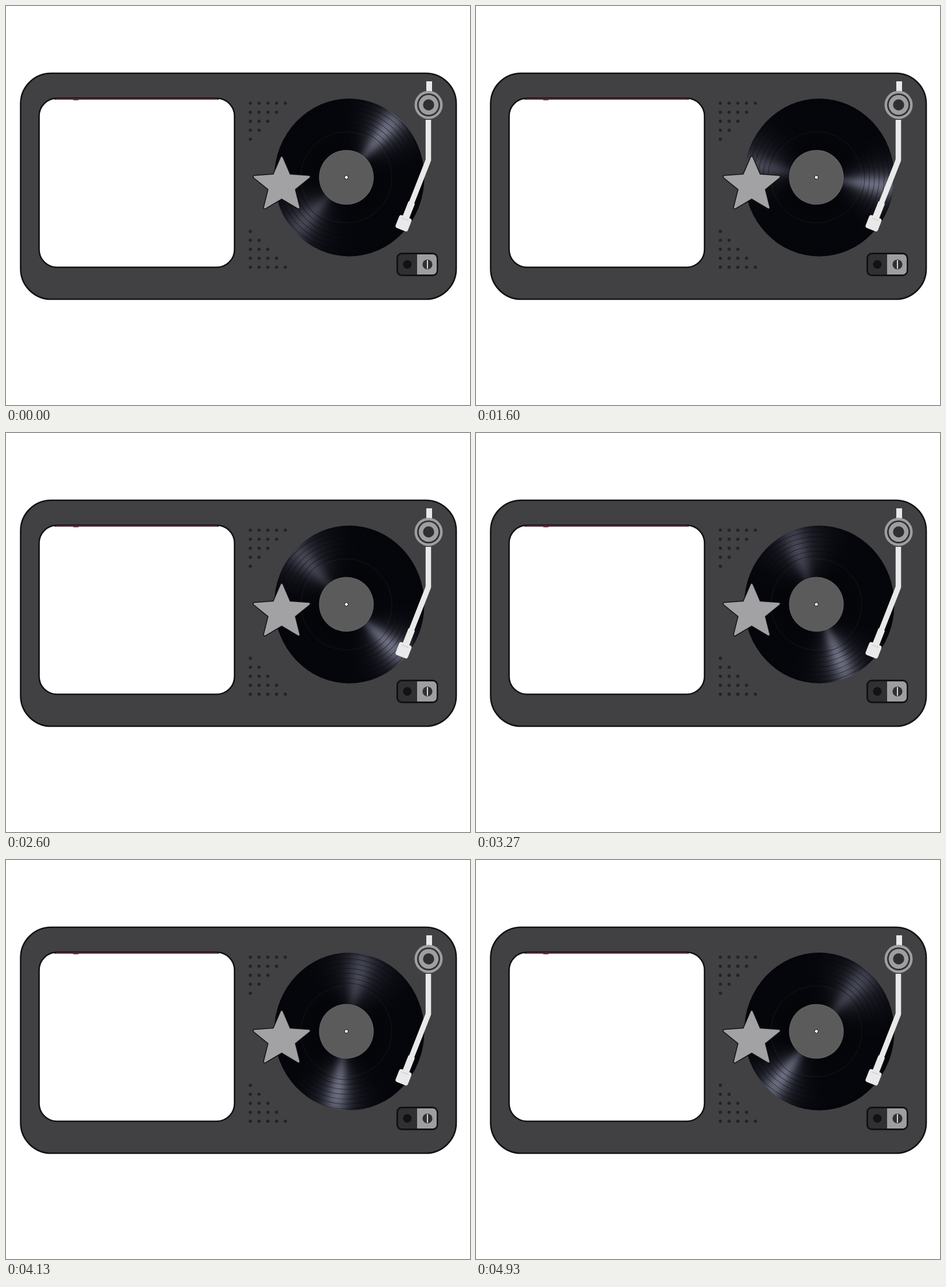
An HTML page with a canvas that plays this animation: 807x694 px, repeating every 4.99 s.

```html
<!DOCTYPE html>
<html lang="en">
<head>
<meta charset="utf-8">
<title>Record player</title>
<style>
html, body { margin: 0; width: 100%; height: 100%; overflow: hidden; background: #fff; }
canvas { display: block; }
</style>
</head>
<body>
<canvas id="stage" width="807" height="694"></canvas>
<script>
const ctx = document.getElementById('stage').getContext('2d');
const LOOP = 4990, STEPS = 75, TAU = Math.PI * 2, DEG = Math.PI / 180;
const INK = '#121214', DARK = '#303032', GRAY = '#9e9ea0', ARM = '#e9e9e9';

function disc(x, y, r, fill) {
  ctx.beginPath();
  ctx.arc(x, y, r, 0, TAU);
  ctx.fillStyle = fill;
  ctx.fill();
}

function ring(r, color, width) {
  ctx.beginPath();
  ctx.arc(0, 0, r, 0, TAU);
  ctx.strokeStyle = color;
  ctx.lineWidth = width;
  ctx.stroke();
}

function box(x, y, w, h, r, fill, line = 0) {
  ctx.beginPath();
  ctx.roundRect(x, y, w, h, r);
  ctx.fillStyle = fill;
  ctx.fill();
  if (!line) return;
  ctx.strokeStyle = INK;
  ctx.lineWidth = line;
  ctx.stroke();
}

// Two facing reflections: a bright one at 0 degrees, a dimmer, wider one opposite.
function makeShine() {
  const gradient = ctx.createConicGradient(0, 0, 0);
  for (let a = 0; a <= 360; a += 2) {
    const bell = (center, width) => {
      const d = Math.abs(a - center);
      return Math.exp(-((Math.min(d, 360 - d) / width) ** 2));
    };
    const light = 0.62 * bell(0, 9) + 0.34 * bell(0, 21)
      + 0.34 * bell(184, 10) + 0.26 * bell(186, 25);
    gradient.addColorStop(a / 360,
      `rgb(${5 + 112 * light},${6 + 113 * light},${11 + 128 * light})`);
  }
  return gradient;
}

// Darkens the record towards its label and its rim.
function makeShade() {
  const reach = 142, gradient = ctx.createRadialGradient(0, 0, 0, 0, 0, reach);
  for (let r = 44; r <= reach; r += 7) {
    const alpha = Math.min(0.65, 0.5 * ((r - 102) / 50) ** 2);
    gradient.addColorStop(r / reach, `rgba(3,4,8,${alpha})`);
  }
  return gradient;
}

const shine = makeShine(), shade = makeShade();

function drawCase() {
  box(25.5, 117, 757.5, 393, 53, '#414143', 2.6);
  box(57.5, 160.5, 340, 294, 31, '#fff', 2.6);
  ctx.fillStyle = '#7d1a42';
  ctx.fillRect(84, 162, 286, 1);
  ctx.fillRect(117, 163, 9, 1);
  for (let row = 0; row < 5; row++) {
    for (let i = 0; i < 5 - row; i++) {
      const x = 425 + i * 15.2;
      disc(x, 169 + row * 15.7, 2.8, '#232325');
      disc(x, 454.3 - row * 15.6, 2.8, '#232325');
    }
  }
}

function drawRecord(turn) {
  ctx.save();
  ctx.beginPath();
  ctx.ellipse(597, 298.3, 130.5, 137.2, 0, 0, TAU);
  ctx.clip();
  ctx.translate(592, 298);
  ctx.rotate(turn);
  for (const fill of [shine, shade]) {
    ctx.fillStyle = fill;
    ctx.fillRect(-200, -200, 400, 400);
  }
  for (let r = 84; r < 136; r += 8.5) ring(r, 'rgba(5,6,12,.45)', 1.2);
  for (let r = 55; r < 136; r += 3) ring(r, 'rgba(3,4,8,.12)', 1);
  ring(79, 'rgba(62,46,56,.4)', 0.8);
  disc(0, 0, 47.5, '#6b6b67');
  disc(0, 0, 46.7, '#5b5b5b');
  disc(0, 0, 3.8, DARK);
  box(-2.3, -2.3, 4.6, 4.6, 1, '#fff');
  ctx.restore();
}

function drawStar() {
  ctx.beginPath();
  for (let i = 0; i < 10; i++) {
    const r = i % 2 ? 21.5 : 48, a = i * TAU / 10;
    ctx.lineTo(479.5 + 1.04 * r * Math.sin(a), 311.8 - r * Math.cos(a));
  }
  ctx.closePath();
  ctx.lineJoin = 'round';
  ctx.strokeStyle = INK;
  ctx.lineWidth = 6;
  ctx.stroke();
  ctx.fillStyle = ctx.strokeStyle = '#a2a2a4';
  ctx.lineWidth = 3;
  ctx.stroke();
  ctx.fill();
}

function drawArm() {
  box(731, 131, 10, 20, 0, ARM);
  disc(735, 172, 24.5, GRAY);
  disc(735, 172, 20, DARK);
  disc(735, 172, 17.2, GRAY);
  disc(735, 172, 9.7, DARK);
  box(729.8, 198, 9.5, 71, 0, ARM);
  ctx.save();
  ctx.translate(734.5, 268);
  ctx.rotate(21.4 * DEG);
  box(-4.75, -1, 9.5, 85, 1, ARM);
  box(-6, 79, 12, 30, 1, ARM);
  box(-11.5, 106, 23, 24, 4, ARM);
  box(-6, 110, 12, 1, 0, '#c4c4c4');
  ctx.restore();
}

function drawSwitch() {
  box(680.5, 430.5, 69.5, 38, 8, DARK, 3);
  box(715, 432, 34, 35, [0, 7, 7, 0], GRAY);
  disc(698, 449.5, 7.5, INK);
  disc(733, 449.5, 8.6, DARK);
  box(732, 442, 2, 15, 0, '#d8d8d8');
}

// The record advances half a turn per loop, in equal steps.
function draw(time) {
  const step = Math.floor((time % LOOP) * 0.015 + 0.06) % STEPS;
  const degrees = 39.5 + step * 180 / STEPS;
  ctx.fillStyle = '#fff';
  ctx.fillRect(0, 0, 807, 694);
  drawCase();
  drawRecord((degrees - 90) * DEG);
  drawStar();
  drawArm();
  drawSwitch();
}

const start = performance.now();
function tick() {
  draw(performance.now() - start);
  requestAnimationFrame(tick);
}
tick();
</script>
</body>
</html>
```
